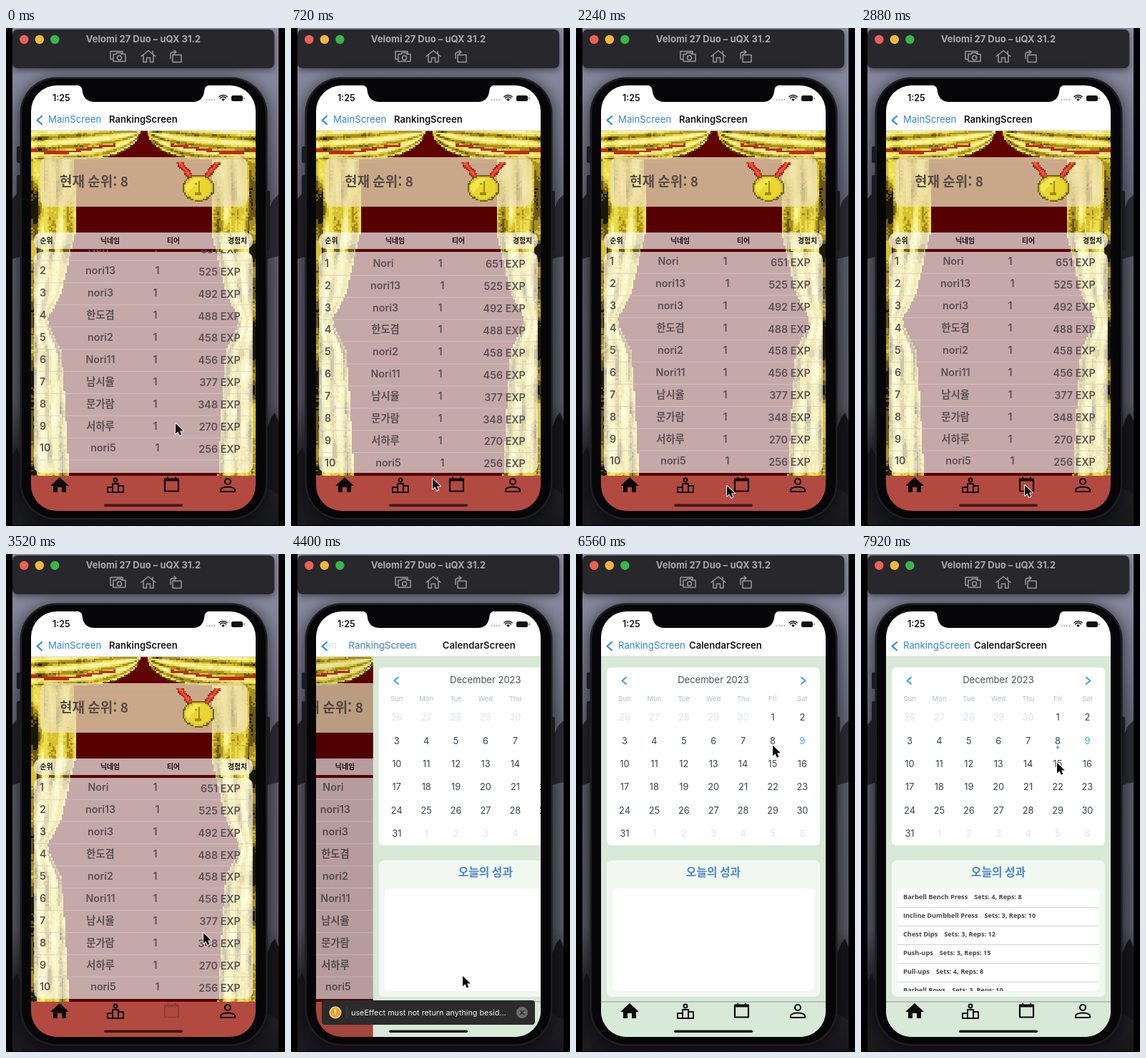
An HTML page with a canvas that plays this animation: 390 px wide and 694 px high, repeating every 8 s.

```html
<!DOCTYPE html>
<html lang="ko">
<head>
<meta charset="utf-8">
<title>Ranking and calendar</title>
<style>
html, body { margin: 0; width: 100%; height: 100%; overflow: hidden; background: #000; }
canvas { display: block; width: 390px; height: 694px; }
</style>
</head>
<body>
<canvas id="stage"></canvas>
<script>
const W = 390, H = 694, LOOP = 8000, STEP = 80;
const stage = document.getElementById('stage');
const dpr = window.devicePixelRatio || 1;
stage.width = W * dpr;
stage.height = H * dpr;
const g = stage.getContext('2d');

const UI = 'Inter, "Noto Sans CJK KR", sans-serif';
const KR = '"Noto Sans CJK KR", "Noto Sans CJK", sans-serif';
const BLUE = '#2f86e0';
const SCREEN = { x: 35, y: 80, w: 314, h: 593 };

const clamp = v => Math.max(0, Math.min(1, v));
const smooth = v => v * v * (3 - 2 * v);
const linear = v => v;
const hash = (x, y) => {
  const v = Math.sin(x * 127.1 + y * 311.7) * 43758.5453;
  return v - Math.floor(v);
};

// Eased value along keys of the form [position, value].
function track(p, keys, ease = smooth) {
  if (p <= keys[0][0]) return keys[0][1];
  for (let i = 1; i < keys.length; i++) {
    const [a, from] = keys[i - 1], [b, to] = keys[i];
    if (p <= b) return from + (to - from) * ease((p - a) / (b - a));
  }
  return keys[keys.length - 1][1];
}

function text(s, x, y, font, color, align = 'left') {
  g.font = font;
  g.fillStyle = color;
  g.textAlign = align;
  g.textBaseline = 'middle';
  g.fillText(s, x, y);
}

function box(x, y, w, h, r, color) {
  g.beginPath();
  g.roundRect(x, y, w, h, r);
  g.fillStyle = color;
  g.fill();
}

function shadowBox(blur, alpha, ...args) {
  g.save();
  g.shadowColor = `rgba(0,0,0,${alpha})`;
  g.shadowBlur = blur * dpr;
  g.shadowOffsetY = 3 * dpr;
  box(...args);
  g.restore();
}

function rect(x, y, w, h, color) {
  g.fillStyle = color;
  g.fillRect(x, y, w, h);
}

function disc(x, y, r, color) {
  g.beginPath();
  g.arc(x, y, r, 0, Math.PI * 2);
  g.fillStyle = color;
  g.fill();
}

function shape(d, x, y, fill, stroke, width = 1.5) {
  const path = new Path2D(d);
  g.save();
  g.translate(x, y);
  g.lineJoin = 'round';
  g.lineCap = 'round';
  if (stroke) {
    g.strokeStyle = stroke;
    g.lineWidth = width;
    g.stroke(path);
  }
  if (fill) {
    g.fillStyle = fill;
    g.fill(path);
  }
  g.restore();
}

function clipped(path, draw) {
  g.save();
  g.beginPath();
  path();
  g.clip();
  draw();
  g.restore();
}

function vertical(y0, y1, stops) {
  const grad = g.createLinearGradient(0, y0, 0, y1);
  stops.forEach(([at, color]) => grad.addColorStop(at, color));
  return grad;
}

// Pixel art: one colour per cell, enlarged without smoothing.
function pixels(w, h, cell, colorAt) {
  const c = document.createElement('canvas');
  c.width = Math.ceil(w / cell);
  c.height = Math.ceil(h / cell);
  const p = c.getContext('2d');
  for (let y = 0; y < c.height; y++) {
    for (let x = 0; x < c.width; x++) {
      const color = colorAt((x + .5) * cell, (y + .5) * cell);
      if (!color) continue;
      p.fillStyle = color;
      p.fillRect(x, y, 1, 1);
    }
  }
  return (x, y) => {
    g.imageSmoothingEnabled = false;
    g.drawImage(c, x, y, c.width * cell, c.height * cell);
  };
}

const GOLD = ['#1c1806', '#6b5812', '#a88f20', '#d6c232', '#ecdd4e', '#f3e870', '#faf3a6'];
const gold = v => GOLD[Math.floor(clamp(v) * 6.99)];
const HEM = [[40, 61], [142, 62], [170, 55], [227, 42], [262, 23], [277, 27], [307, 42], [357, 46], [481, 53]];

// Value noise along a line, smooth between whole steps.
function wave(x, seed) {
  const i = Math.floor(x);
  const a = hash(i, seed), b = hash(i + 1, seed);
  return a + (b - a) * smooth(x - i);
}

const drawCurtain = pixels(314, 481, 2.5, (x, y) => {
  const side = x < 157 ? 1 : 2;
  const m = side === 1 ? x : 314 - x;
  const grain = hash(Math.floor(x), Math.floor(y)) - .5;

  // Swag: folds gather towards the top centre.
  const reach = Math.max(0, m - 70) / 82;
  const low = reach < 1 ? 41 * Math.sqrt(1 - reach * reach) : 0;
  if (y < low) {
    const v = y / low;
    if (v > .95) return '#6b5812';
    if (Math.abs(v - .66 - .08 * Math.sin(m / 22)) < .045 && m < 118) return '#c22a18';
    return gold(.56 + .32 * Math.sin(v * 17 + m * .03) + (wave(m / 14, side) - .5) * .3 + grain * .12);
  }

  // Side drape: folds follow the hem, with a shaded outer edge.
  const edge = track(y, HEM, linear);
  if (m < edge) {
    const u = m / edge;
    const fold = Math.sin(u * 17 + wave(y / 60, side) * 3);
    const patch = wave(y / 28, Math.floor(u * 7) + side * 20) - .5;
    return gold(.58 + .2 * fold + patch * .5 + grain * .12 - .45 * clamp(1 - u * 5));
  }
  return y < 45 ? '#600202' : '#560000';
});

const drawMedal = pixels(62, 56, 2.2, (x, y) => {
  const cx = x - 31, cy = y - 36;
  const r = Math.hypot(cx / 22.5, cy / 18.5);
  if (r < 1) {
    if (r > .9) return '#6f6522';
    if (r > .78) return '#dcc426';
    const one = Math.abs(cx) < 1.2 && Math.abs(cy) < 9 ||
      Math.abs(cy - 8) < 1.2 && Math.abs(cx) < 4 || Math.abs(cx + 2.5) < 1.2 && Math.abs(cy + 6) < 1.2;
    return one ? '#a08a1c' : cx + cy < -8 ? '#f3e64e' : '#ead632';
  }
  const band = Math.abs(Math.abs(cx) - (27 - y * .8));
  if (y < 24 && band < 5.4) return band > 4 ? '#8a2a20' : band < 1.2 ? '#ee5c48' : '#d8351f';
  return null;
});

const ICONS = {
  home: 'M0-11L13 1H9V10H3V3H-3V10H-9V1H-13Z',
  podium: 'M-11 10V3H-4V10ZM-4 10V-2H4V10ZM4 10V1H11V10ZM-2.5-7a2.5 2.5 0 1 0 5 0a2.5 2.5 0 1 0-5 0',
  calendar: 'M-9.5-8H9.5V9H-9.5ZM-9.5-6H9.5M-5.5-10V-8M5.5-10V-8',
  person: 'M-4-5a4 4 0 1 0 8 0a4 4 0 1 0-8 0M-10 9V7C-10 1 10 1 10 7V9Z'
};

function tabBar(bg, pressed) {
  rect(35, 624, 314, 49, bg);
  shape(ICONS.home, 75, 637, '#0b0808');
  shape(ICONS.podium, 153, 637, null, '#0b0808', 1.9);
  g.globalAlpha = 1 - .8 * pressed;
  shape(ICONS.calendar, 231.5, 636.5, null, '#0b0808', 2.2);
  g.globalAlpha = 1;
  shape(ICONS.person, 310, 637, null, '#0b0808', 2.1);
}

const PLAYERS = [
  ['Nori', 651], ['nori13', 525], ['nori3', 492], ['한도겸', 488], ['nori2', 458],
  ['Nori11', 456], ['남시율', 377], ['문가람', 348], ['서하루', 270], ['nori5', 256]
];

function ranking(scroll, pressed) {
  rect(35, 143, 314, 481, '#560000');
  drawCurtain(35, 143);

  box(48, 180, 289, 69, 10, 'rgba(239,225,184,.75)');
  text('현재 순위: 8', 75, 214, '700 19px ' + KR, '#574c43');
  drawMedal(238, 187);

  const glass = 'rgba(255,255,255,.66)';
  box(39, 285, 306, 23, 10, glass);
  [['순위', 56.5], ['닉네임', 145.5], ['티어', 234], ['경험치', 323.5]]
    .forEach(([s, x]) => text(s, x, 296, '900 9.8px ' + KR, '#181214', 'center'));

  box(39, 312, 306, 308, 10, glass);
  clipped(() => g.rect(39, 309, 306, 311), () => {
    const font = '600 14.3px ' + UI, ink = '#5c5256';
    PLAYERS.forEach(([name, exp], i) => {
      const y = 326 + scroll + i * 30.9;
      const wide = i === 9 ? 4 : i === 0 ? -3 : 0;
      text(i + 1, 47, y, font, ink);
      text(name, 132 + wide, y, font, ink, 'center');
      text('1', 208.5 + (i === 1 || i === 9 ? 3 : 0), y, font, ink, 'center');
      text(exp + ' EXP', 327.8, y + 1.5, font, ink, 'right');
      rect(39, y + 15.5, 306, 1, 'rgba(215,200,204,.75)');
    });
  });
  tabBar('#b34a41', pressed);
}

const DAYS = ['Sun', 'Mon', 'Tue', 'Wed', 'Thu', 'Fri', 'Sat'];
const WORKOUT = [
  ['Barbell Bench Press', 4, 8], ['Incline Dumbbell Press', 3, 10], ['Chest Dips', 3, 12],
  ['Push-ups', 3, 15], ['Pull-ups', 4, 8], ['Barbell Rows', 3, 10]
];

function calendar(loaded) {
  rect(35, 143, 314, 530, '#d8e9d8');
  box(43, 158, 298, 248, 6, '#fff');
  text('December 2023', 192, 176.5, '400 13px ' + UI, '#43515e', 'center');
  shape('M3-4.5L-2.5 0L3 4.5', 67, 176.5, null, '#3a9ce8', 2);
  shape('M-3-4.5L2.5 0L-3 4.5', 318, 176.5, null, '#3a9ce8', 2);
  DAYS.forEach((d, i) => text(d, 68 + i * 41.4, 202, '400 9.5px ' + UI, '#b4bec8', 'center'));
  for (let i = 0; i < 42; i++) {
    const day = i - 4;
    const x = 68 + (i % 7) * 41.4, y = 228.5 + Math.floor(i / 7) * 32.3;
    const inside = day >= 1 && day <= 31;
    const label = day < 1 ? day + 30 : day > 31 ? day - 31 : day;
    text(label, x, y, '400 12.8px ' + UI, !inside ? '#dde3e8' : day === 9 ? '#35a6ee' : '#36434f', 'center');
    if (loaded && day === 8) disc(x, y + 8.8, 1.8, '#35a6ee');
  }

  box(43, 427, 298, 190, 7, '#f2f7f2');
  text('오늘의 성과', 192, 443, '700 15.8px ' + KR, '#4a88c8', 'center');
  box(51, 466, 282, 143, 7, '#fff');
  if (loaded) {
    clipped(() => g.rect(51, 466, 282, 143), () => WORKOUT.forEach(([name, sets, reps], i) => {
      const y = 479 + i * 26, font = '700 9.2px "Open Sans", sans-serif';
      text(name, 59, y, font, '#454545');
      const gap = g.measureText(name).width + 9;
      text(`Sets: ${sets}, Reps: ${reps}`, 59 + gap, y, font, '#454545');
      rect(51, y + 13, 282, 1, '#d2d2d2');
    }));
  }
  tabBar('#d8e9d8', 0);
  rect(35, 623.5, 314, 1, '#8d978d');
}

function header(p) {
  rect(35, 80, 314, 63, '#fff');
  rect(35, 142.5, 314, 1, '#d4d4d6');
  text('1:25', 65, 98, '600 12.5px ' + UI, '#111');
  for (let i = 0; i < 4; i++) disc(280.5 + i * 3.6, 100, 1, '#a5a5a8');
  shape('M0 4L-2.3 1.4A3.4 3.4 0 0 1 2.3 1.4Z', 303.5, 98, '#111');
  shape('M-4-.3A5.8 5.8 0 0 1 4-.3M-5.6-2.2A8 8 0 0 1 5.6-2.2', 303.5, 98, null, '#111', 1.5);
  box(315, 94, 16, 8, 2.5, '#111');
  box(332, 96.5, 1.5, 3, 1, '#777');

  const plain = '400 13.2px ' + UI, bold = '600 13.1px ' + UI;
  clipped(() => g.rect(46, 110, 303, 32), () => {
    const slide = 144 - 85 * p;
    g.globalAlpha = 1 - p;
    text('MainScreen', 59 - 93 * p, 128.5, plain, BLUE);
    text('RankingScreen', slide, 128.5, bold, '#151515');
    g.globalAlpha = p;
    text('RankingScreen', slide, 128.5, plain, BLUE);
    g.globalAlpha = clamp(p * 1.3);
    text('CalendarScreen', 158 + 212 * (1 - p), 128.5, bold, '#151515');
    g.globalAlpha = 1;
  });
  shape('M3.5-5.5L-3 0L3.5 5.5', 46.5, 128.5, null, BLUE, 2.2);
}

function toast() {
  box(43, 622, 298, 34, 4, '#2b2b2c');
  disc(62, 639, 8.5, '#f6e3bd');
  disc(62, 639, 7.2, '#efa328');
  text('!', 62, 639, '700 10px ' + UI, '#fff', 'center');
  rect(77.5, 630, 1, 18, '#4a4a4b');
  text('useEffect must not return anything besid...', 84, 639.5, '400 10.8px ' + UI, '#f2f2f2');
  disc(323, 639, 8, '#6c6c6e');
  shape('M-2.7-2.7L2.7 2.7M2.7-2.7L-2.7 2.7', 323, 639, null, '#2b2b2c', 1.5);
}

function desktop() {
  rect(0, 0, W, H, '#000');
  clipped(() => g.rect(9, 0, 372, 693), () => {
    rect(9, 0, 372, 693, vertical(0, 693, [
      [0, '#8f8fa6'], [.2, '#7d7d92'], [.34, '#66667a'], [.48, '#5d5d6a'], [.75, '#5a5a66'], [.85, '#2c2c33'], [1, '#17171b']
    ]));
    shape('M9 238L16 230L22 245V318L9 322Z', 0, 0, '#24242b');
    shape('M364 262L373 240L381 232V318L364 322Z', 0, 0, '#2c2c35');
    shape('M364 560L371 542L376 536L381 548V650L364 640Z', 0, 0, '#17171b');
    shape('M9 596L15 584L22 602V693H9Z', 0, 0, '#1a1a1f');
    shadowBox(10, .5, 9, 2, 366, 54, 7, '#27272c');
    shadowBox(22, .7, 19.5, 68.5, 346, 617, 51, '#1e1e22');
  });

  ['#ec5f57', '#f0b83a', '#39b54a'].forEach((c, i) => disc(25.3 + i * 21.5, 16, 6.2, c));
  text('Velomi 27 Duo – uQX 31.2', 192, 16, '700 13px ' + UI, '#a9a9ad', 'center');
  const line = '#98989c';
  shape('M-11-7H6V-4M-11-7V4H-8M-7-3H-3L-2-5H4L5-3H10V7H-7ZM-1.5 2a3 3 0 1 0 6 0a3 3 0 1 0-6 0', 157, 39.5, null, line);
  shape('M-10 0L0-8L10 0M-7-2V8H-2.5V2H2.5V8H7V-2M6-7V-4', 199, 39.5, null, line);
  shape('M-4-2H8V8H-4ZM-7 3V-3Q-7-6-3-6H0M-2-8.5L1-6L-2-3.5', 237, 39.5, null, line);

  [[165, 23], [205, 38], [253, 40]].forEach(([y, h]) => box(15, y, 6, h, 2, '#1b1b1e'));
  box(364, 227, 5, 82, 2, '#1b1b1e');
  box(22, 71, 341, 612, 49, '#060608');
}

function notch() {
  shape('M98 79.5Q106 80 106.5 86Q108 103 124 103H261Q276 103 277.5 86Q278 80 286 79.5Z', 0, 0, '#060608');
}

const POINTER = [
  [0, 237, 551], [720, 198, 628], [1500, 203, 634], [2240, 211, 638], [2900, 229, 637], [3200, 230, 636],
  [3520, 276, 528], [3900, 268, 545], [4400, 240, 588], [5280, 310, 622], [5520, 322, 637], [5760, 322, 637],
  [6640, 274, 258], [7120, 274, 258], [7680, 274, 291]
];
const pointerX = POINTER.map(([t, x]) => [t, x]);
const pointerY = POINTER.map(([t, , y]) => [t, y]);
const SCROLL = [[0, -18], [520, 3], [760, 2.4], [1200, 0]];
const PRESS = [[3180, 0], [3300, 1], [3640, 1], [3800, 0]];
const PUSH = 4200, TOAST = [4240, 5600], LOADED = 6960;

function render(t) {
  g.setTransform(dpr, 0, 0, dpr, 0, 0);
  desktop();

  const since = (t - PUSH) / 1000;
  const p = since <= 0 ? 0 : since > .8 ? 1 : 1 - Math.exp(-6.85 * since);
  const { x, y, w, h } = SCREEN;
  clipped(() => g.roundRect(x, y, w, h, 36), () => {
    if (p < 1) {
      g.save();
      g.translate(-94 * p, 0);
      ranking(track(t, SCROLL), track(t, PRESS));
      g.restore();
      if (p) rect(x, 143, w, 530, `rgba(0,0,0,${.1 * p})`);
    }
    if (p > 0) {
      g.save();
      g.translate(w * (1 - p), 0);
      calendar(t >= LOADED);
      g.restore();
    }
    header(p);
    if (t >= TOAST[0] && t < TOAST[1]) toast();
    box(137, 663.5, 110, 3.4, 1.7, p > .3 ? '#141614' : '#3a1714');
  });
  notch();
  shape('M0 0V14.5L3.4 11.4L5.8 16.8L8.4 15.7L6.1 10.4H10.8Z',
    track(t, pointerX), track(t, pointerY), '#0a0a0a', '#fff', 1.8);
}

const start = performance.now();
function tick() {
  const t = (performance.now() - start) % LOOP;
  render(Math.floor(t / STEP) * STEP);
  requestAnimationFrame(tick);
}
tick();
</script>
</body>
</html>
```
